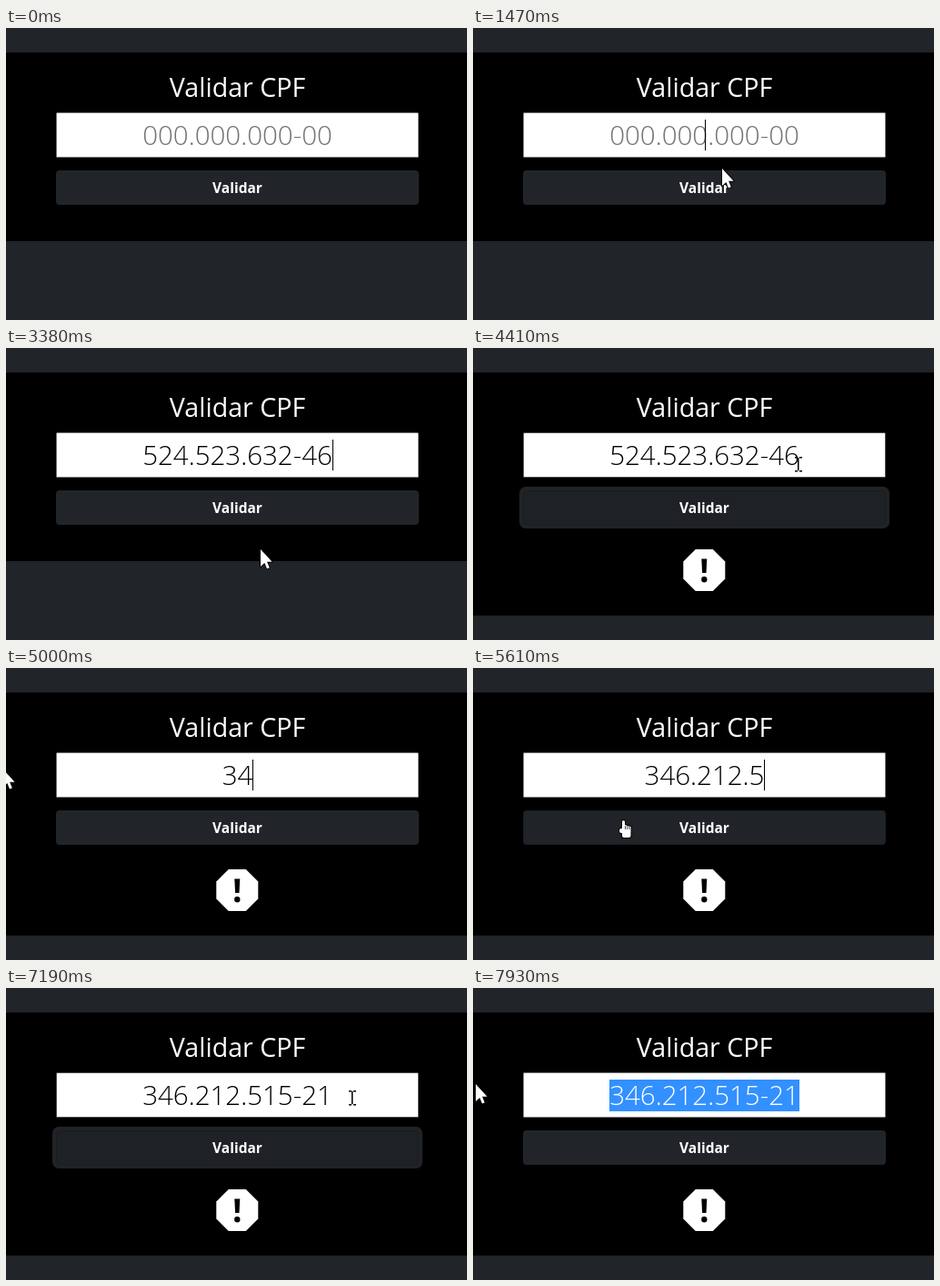
An HTML page with a canvas that plays this animation: 507 px wide and 322 px high, repeating every 8 s.

```html
<!DOCTYPE html>
<html lang="pt-BR">
<head>
<meta charset="utf-8">
<title>Validar CPF</title>
<style>
html, body { margin: 0; width: 100%; height: 100%; overflow: hidden; background: #212429; }
canvas { display: block; width: 507px; height: 322px; }
</style>
</head>
<body>
<canvas id="stage" width="507" height="322"></canvas>
<script>
const ctx = document.getElementById('stage').getContext('2d');
const LOOP = 8000, BLINK = 535, MID = 254.5;
const SANS = '"Open Sans", "Noto Sans", sans-serif';
const FIELD_FONT = '340 29.5px ' + SANS;
const FIELD = { x: 55, y: 93, w: 399, h: 50 };
const BUTTON = { x: 55, y: 157, w: 399, h: 38 };

const FIRST = { text: '524.523.632-46', start: 1930, pace: 115 };
const SECOND = { text: '346.212.515-21', start: 4880, pace: 110 };

const CLICKS = [
  { at: 1205, on: 'field' }, { at: 3750, on: 'button' }, { at: 4480, on: 'drag' },
  { at: 6500, on: 'button' }, { at: 7540, on: 'drag' }
];

const spot = (x, y) => ({ x, y });
const below = spot(280, 222), field = spot(272, 118), button = spot(288, 176);
const MOVES = [
  { at: 270, ms: 340, to: field },
  { at: 1320, ms: 280, to: spot(275, 184) },
  { at: 1880, ms: 760, to: below },
  { at: 3390, ms: 220, to: button },
  { at: 3900, ms: 500, to: spot(358, 128) },
  { at: 4480, ms: 320, to: spot(-3, 112) },
  { at: 5070, ms: 230, to: spot(32, 160) },
  { at: 5300, ms: 600, to: button },
  { at: 6560, ms: 700, to: spot(384, 119) },
  { at: 7540, ms: 380, to: spot(3, 106) }
];

const ease = p => p * p * (3 - 2 * p);
const mix = (a, b, p) => a + (b - a) * p;

function pointer(t) {
  if (t < MOVES[0].at) return null;
  let p = below;
  for (const { at, ms, to } of MOVES) {
    if (t < at) break;
    const k = ease(Math.min(1, (t - at) / ms));
    p = spot(mix(p.x, to.x, k), mix(p.y, to.y, k));
  }
  return p;
}

const inside = (p, b) => p && p.x >= b.x && p.x < b.x + b.w && p.y >= b.y && p.y < b.y + b.h;
const focusAt = t => CLICKS.filter(c => c.at <= t).pop()?.on;

// Masked typing: separators arrive together with the next digit
function typed({ text, start, pace }, t) {
  const digits = Math.floor((t - start) / pace) + 1;
  if (digits <= 0) return '';
  if (digits >= 11) return text;
  return text.slice(0, digits + Math.floor((digits - 1) / 3));
}

function lastEdit(t) {
  const entry = [SECOND, FIRST].find(e => t >= e.start);
  if (!entry) return CLICKS[0].at;
  const { start, pace } = entry;
  return start + pace * Math.min(10, Math.floor((t - start) / pace));
}

function rect(color, x, y, w, h) {
  ctx.fillStyle = color;
  ctx.fillRect(x, y, w, h);
}

// Rounded box grown (or shrunk) by d on every side
function box(color, { x, y, w, h }, d, r) {
  ctx.fillStyle = color;
  ctx.beginPath();
  ctx.roundRect(x - d, y - d, w + 2 * d, h + 2 * d, r);
  ctx.fill();
}

function label(text, font, color, x, y, align = 'center') {
  ctx.font = font;
  ctx.fillStyle = color;
  ctx.textAlign = align;
  ctx.fillText(text, x, y);
}

function drawField(t, p) {
  box(inside(p, FIELD) ? '#4f4f4f' : '#767676', FIELD, 0, 1.5);
  box('#fff', FIELD, -1, 0.5);

  const second = t >= SECOND.start, focus = focusAt(t);
  const text = typed(second ? SECOND : FIRST, t);
  ctx.font = FIELD_FONT;
  const width = ctx.measureText(text).width, left = MID - width / 2;
  label(text || '000.000.000-00', FIELD_FONT, text ? '#000' : '#757575', MID, 129);

  const dragging = focus === 'drag' && (!second || t >= CLICKS.at(-1).at);
  if (dragging) {
    // Select from the pointer to the end of the text, by whole characters
    const at = n => left + ctx.measureText(text.slice(0, n)).width;
    let from = text.length;
    while (from > 0 && (at(from) + at(from - 1)) / 2 > p.x) from--;
    if (from < text.length) {
      const start = Math.round(at(from));
      rect('#3390ff', start, 101, Math.round(left + width) - start, 35);
      label(text.slice(from), FIELD_FONT, '#fff', at(from), 129, 'left');
      return;
    }
  }
  const lit = dragging || (t - lastEdit(t)) % (2 * BLINK) < BLINK;
  if (focus && focus !== 'button' && lit) rect('#000', Math.round(left + width), 101, 1, 34);
}

function drawButton(t, p) {
  const focused = focusAt(t) === 'button';
  if (focused) box('#212325', BUTTON, 4, 7);
  if (focused || inside(p, BUTTON)) {
    box('#1a1e21', BUTTON, 0, 4);
    box(focused ? '#1e2125' : '#202428', BUTTON, -1, 3);
  } else {
    box('#212529', BUTTON, 0, 4);
  }
  label('Validar', '700 15.5px ' + SANS, '#fff', MID, 182);
}

function polygon(points) {
  ctx.beginPath();
  for (const [x, y] of points) ctx.lineTo(x, y);
  ctx.closePath();
}

function drawAlert() {
  const x = 254.3, y = 245, corner = i => (i + 0.5) * Math.PI / 4;
  polygon(Array.from({ length: 8 }, (_, i) => [x + 24.9 * Math.cos(corner(i)), y + 24.9 * Math.sin(corner(i))]));
  ctx.fillStyle = '#fff';
  ctx.fill();
  polygon([[x - 3, y - 12.5], [x + 3, y - 12.5], [x + 2.2, y + 3], [x - 2.2, y + 3]]);
  ctx.arc(x, y + 10.3, 3.2, 0, 7);
  ctx.fillStyle = '#000';
  ctx.fill();
}

function outlined() {
  ctx.lineJoin = 'round';
  ctx.lineWidth = 2;
  ctx.strokeStyle = '#000';
  ctx.stroke();
  ctx.fillStyle = '#fff';
  ctx.fill();
}

function drawArrow() {
  polygon([[0, 0], [0, 19], [4.4, 15], [7, 21.4], [9.8, 20.2], [7.1, 13.8], [12.6, 13.8]]);
  outlined();
}

function drawHand() {
  ctx.beginPath();
  ctx.roundRect(-2, 9, 9.5, 10, 2);
  ctx.roundRect(-5, 9, 5, 5, 2);
  for (let i = 0; i < 4; i++) {
    const top = i ? 4.5 + i * 0.6 : 0;
    ctx.roundRect(-2 + i * 2.2, top, 3, 14 - top, 1.5);
  }
  outlined();
  for (let i = 1; i < 4; i++) rect('#000', -1 + i * 2.2, 6, 0.7, 4);
}

function drawBeam() {
  rect('#000', -1, -7, 1.5, 14);
  for (const y of [-8, 7]) {
    for (const x of [-4, 1]) rect('#000', x, y, 3, 1.5);
  }
}

function drawPointer(p) {
  ctx.save();
  ctx.translate(Math.round(p.x), Math.round(p.y));
  if (inside(p, FIELD)) drawBeam();
  else if (inside(p, BUTTON)) drawHand();
  else drawArrow();
  ctx.restore();
}

function draw(t) {
  const p = pointer(t), alerted = t >= CLICKS[1].at;
  rect('#212429', 0, 0, 507, 322);
  rect('#000', 0, 27, 507, alerted ? 268 : 208);
  label('Validar CPF', '400 28.6px ' + SANS, '#fff', MID, 76);
  drawField(t, p);
  drawButton(t, p);
  if (alerted) drawAlert();
  if (p) drawPointer(p);
}

let begin;
function tick(now) {
  begin ??= now;
  draw(Math.max(0, now - begin) % LOOP);
  requestAnimationFrame(tick);
}
draw(0);
requestAnimationFrame(tick);
</script>
</body>
</html>
```
